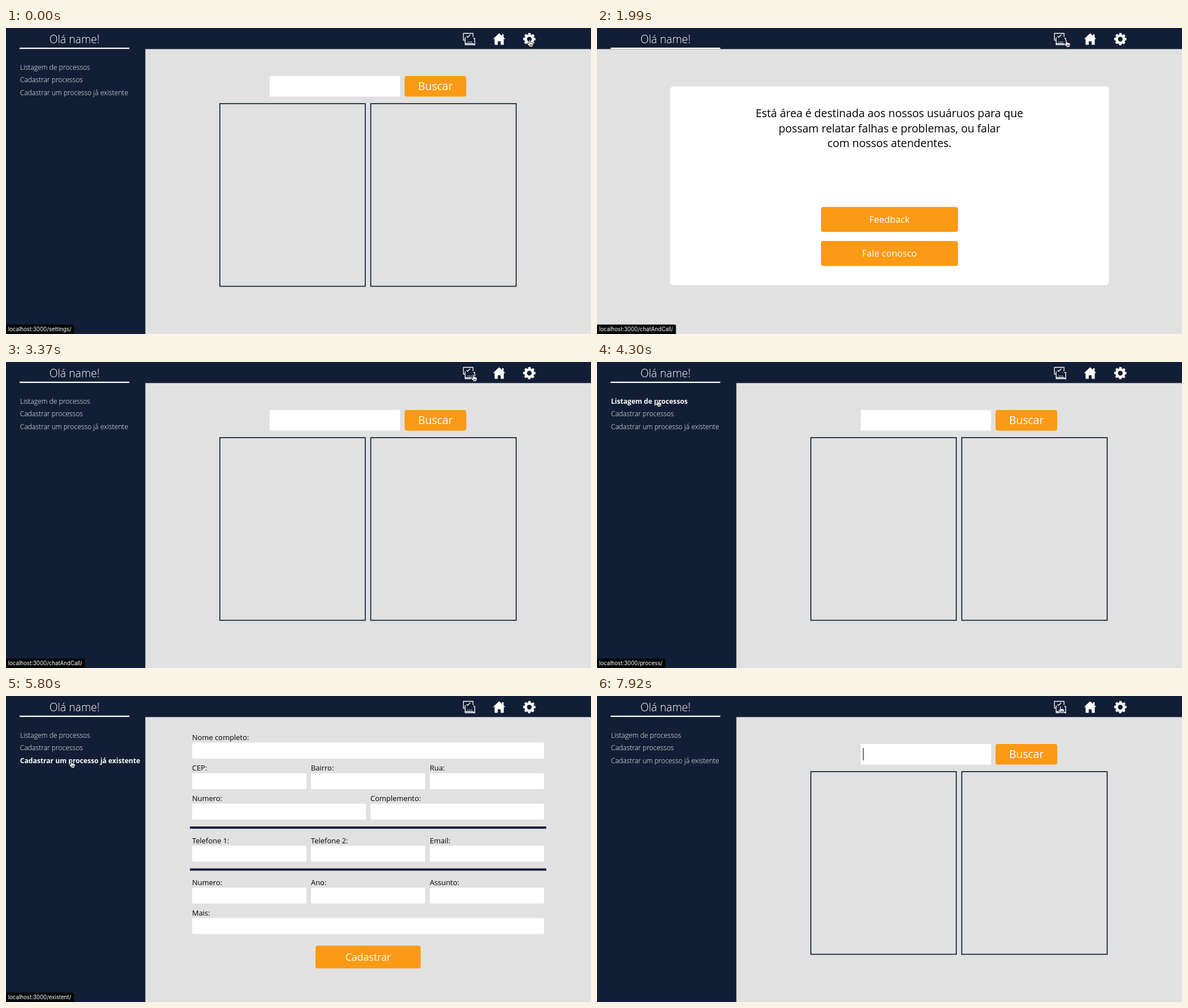
Animation, 1034 px wide and 542 px high, one loop 7.99 s. Source, as an HTML page:

```html
<!DOCTYPE html>
<html lang="pt">
<head>
<meta charset="utf-8">
<style>
html, body { margin: 0; width: 100%; height: 100%; overflow: hidden; background: #e1e1e1; }
svg { display: block; width: 100%; height: 100%; }
text { font-family: "Open Sans", "Noto Sans", sans-serif; white-space: pre; }
.status { font-family: Inter, "Liberation Sans", sans-serif; }
</style>
</head>
<body>
<svg id="stage" viewBox="0 0 1034 542"></svg>
<script>
const NAVY = '#121e35', ORANGE = '#fb9a14', LOOP = 7990;
const stage = document.getElementById('stage');

const rect = (x, y, w, h, fill, r = 0) =>
  `<rect x="${x}" y="${y}" width="${w}" height="${h}" rx="${r}" fill="${fill}"/>`;
const text = (x, y, size, str, fill = '#000', extra = '') =>
  `<text x="${x}" y="${y}" font-size="${size}" fill="${fill}" ${extra}>${str}</text>`;
const centered = (x, y, size, str, fill, extra = '') =>
  text(x, y, size, str, fill, `text-anchor="middle" ${extra}`);
const button = (x, y, w, h, size, str) =>
  rect(x, y, w, h, ORANGE, 4) + centered(x + w / 2, y + h / 2 + size * .36, size, str, '#fff');
const group = (id, body) => `<g id="${id}">${body}</g>`;

// Each row is a list of labels; null is a divider.
function form(y, rows) {
  let out = '';
  for (const row of rows) {
    if (!row) {
      out += rect(325, y - 13.8, 630, 4, NAVY);
      y += 20.2;
      continue;
    }
    const step = 630 / row.length;
    row.forEach((label, i) => {
      const x = 329 + i * step;
      out += text(x, y - 4.6, 12.93, label + ':') + rect(x, y, step - 8, 28.3, '#fff', 2);
    });
    y += 54.1;
  }
  return out + button(547, y - 5.3, 186, 40.3, 17.8, 'Cadastrar');
}

const person = [['Nome completo'], ['CEP', 'Bairro', 'Rua'], ['Numero', 'Complemento'],
  null, ['Telefone 1', 'Telefone 2', 'Email'], null];
const nav = ['Listagem de processos', 'Cadastrar processos', 'Cadastrar um processo já existente'];
const frame = x =>
  `<rect x="${x}" y="134" width="257" height="323.5" fill="none" stroke="${NAVY}" stroke-width="1.7"/>`;

const pages = {
  process: rect(466, 85, 230.5, 36.5, '#fff') + group('caret', rect(470, 92, 1, 22, '#000')) +
    button(704.5, 85, 109, 36.5, 19.4, 'Buscar') + frame(378) + frame(644.7),
  chat: rect(129.3, 103.5, 775.5, 352, '#fff', 6) +
    ['Está área é destinada aos nossos usuáruos para que',
      'possam relatar falhas e problemas, ou falar',
      'com nossos atendentes.'].map((s, i) => centered(517, 158.3 + i * 26.45, 19.4, s)).join('') +
    button(396, 317, 242, 44.3, 16.16, 'Feedback') +
    button(396, 377.3, 242, 44.3, 16.16, 'Fale conosco'),
  register: form(110, [...person, ['Assunto', 'Mais']]),
  existent: form(82.6, [...person, ['Numero', 'Ano', 'Assunto'], ['Mais']])
};

const icons = `
  <g fill="none" stroke="#fff" stroke-width="1.3">
    <path d="M825.5 16V9.5H808.5V21.5H812M826 18.5H828.5V30L825 27.5H811.5V16.5M811.5 27.5V29.5H828"/>
    <path d="M814 14.5l2 2 4.5-4.5"/>
    <path d="M816 24.7h8" stroke-dasharray="1.5 1.5"/>
  </g>
  <path fill="#fff" d="M871.7 9.3L860.8 19.6H863.6V29.8H869.2V23.4H874.3V29.8H879.8V19.6H882.6L879.5 16.6V11H876.8V14.1Z"/>
  <g fill="none" stroke="#fff" transform="translate(925 19.7)">
    <circle r="6.5" stroke-width="4.6"/>
    <circle r="9.3" stroke-width="3.2" stroke-dasharray="4.1 3.204" transform="rotate(-12.6)"/>
  </g>`;

const hand = `<path d="M-.9 7.2V1A1.1 1.1 0 0 1 1.3 1V4.4Q2.4 3.7 3.2 4.8Q4.4 4.2 5 5.3Q6.8 5 6.9 6.6
  V8.6Q6.8 10 5.8 11.3V12.6H0V11.2Q-2 9.4 -3.5 7.1Q-3.6 5.6 -2.2 5.9Z
  M1.3 7.8V11M3 7.8V11M4.7 7.8V11" fill="#fff" stroke="#000" stroke-width=".8" stroke-linejoin="round"/>`;
const arrow = `<path d="M0 0V12.3L2.9 9.6L4.8 14L6.8 13.1L4.9 8.8H8.8Z"
  fill="#000" stroke="#fff" stroke-width=".9"/>`;

stage.innerHTML = rect(0, 0, 1034, 542, '#e1e1e1') + rect(0, 0, 1034, 37.3, NAVY) +
  group('sidebar', rect(0, 37, 246.3, 505, NAVY) + nav.map((s, i) =>
    text(24.7, 73.6 + i * 22.6, 12.12, s, '#fff', `id="nav${i}"`)).join('')) +
  centered(121, 26.6, 19.4, 'Olá name!', '#fff', 'font-weight="300"') +
  rect(24, 34.8, 194, 2.3, '#fff') + icons +
  Object.entries(pages).map(([id, body]) => group(id, body)).join('') +
  group('status', `<path id="statusBox" fill="#050608"/>` +
    text(3.7, 537.2, 9.7, '', '#fff', 'id="url" class="status"')) +
  group('cursor', group('hand', hand) + group('arrow', arrow));

const $ = id => document.getElementById(id);
const show = (id, on) => $(id).setAttribute('visibility', on ? 'inherit' : 'hidden');

// Links: x0, y0, x1, y1, address
const links = [
  [24, 60, 161, 80, 'process'],
  [24, 82, 150, 102, ''],
  [24, 105, 238, 126, 'existent'],
  [806, 8, 831, 31, 'chatAndCall'],
  [860, 8, 884, 31, 'process'],
  [913, 8, 937, 31, 'settings']
];
const views = [[0, 'process'], [930, 'chat'], [3150, 'process'],
  [4780, 'register'], [5400, 'existent'], [6880, 'process']];
// Pointer: time, x, y
const path = [[0, 925, 21], [300, 925, 21], [800, 818, 22], [1800, 818, 22], [2450, 873, 19],
  [3250, 873, 19], [4050, 107, 67], [4380, 107, 67], [4600, 106, 92], [4830, 106, 92],
  [5050, 115, 121], [5650, 115, 121], [6350, 117, 70], [6920, 117, 70], [7220, 520, 104],
  [7400, 520, 104], [7850, 819, 18], [LOOP, 819, 18]];

function pointer(t) {
  const i = path.findIndex(p => p[0] > t);
  const [t0, x0, y0] = path[i - 1], [t1, x1, y1] = path[i];
  const u = (t - t0) / (t1 - t0), e = u * u * (3 - 2 * u);
  return [x0 + (x1 - x0) * e, y0 + (y1 - y0) * e];
}

function draw(t) {
  const view = views.filter(v => v[0] <= t).pop()[1];
  const [x, y] = pointer(t);
  const hit = links.findIndex(([x0, y0, x1, y1], i) =>
    x >= x0 && x <= x1 && y >= y0 && y <= y1 && !(view === 'chat' && i < 3));

  for (const id in pages) show(id, id === view);
  show('sidebar', view !== 'chat');
  $('caret').setAttribute('opacity', t >= 7300 ? 1 : 0);
  nav.forEach((_, i) => $('nav' + i).setAttribute('font-weight', i === hit ? 700 : 300));

  $('cursor').setAttribute('transform', `translate(${x.toFixed(2)} ${y.toFixed(2)})`);
  show('hand', hit >= 0);
  show('arrow', hit < 0);

  const address = hit >= 0 && t < 7500 ? links[hit][4] : '';
  show('status', address);
  if (address) {
    const label = `localhost:3000/${address}/`;
    if ($('url').textContent !== label) {
      $('url').textContent = label;
      const right = 3.7 + $('url').getComputedTextLength() + 5;
      $('statusBox').setAttribute('d', `M0 525.2H${right - 3}q3 0 3 3V542H0Z`);
    }
  }
}

const start = performance.now();
function tick() {
  draw((performance.now() - start) % LOOP);
  requestAnimationFrame(tick);
}
tick();
</script>
</body>
</html>
```
